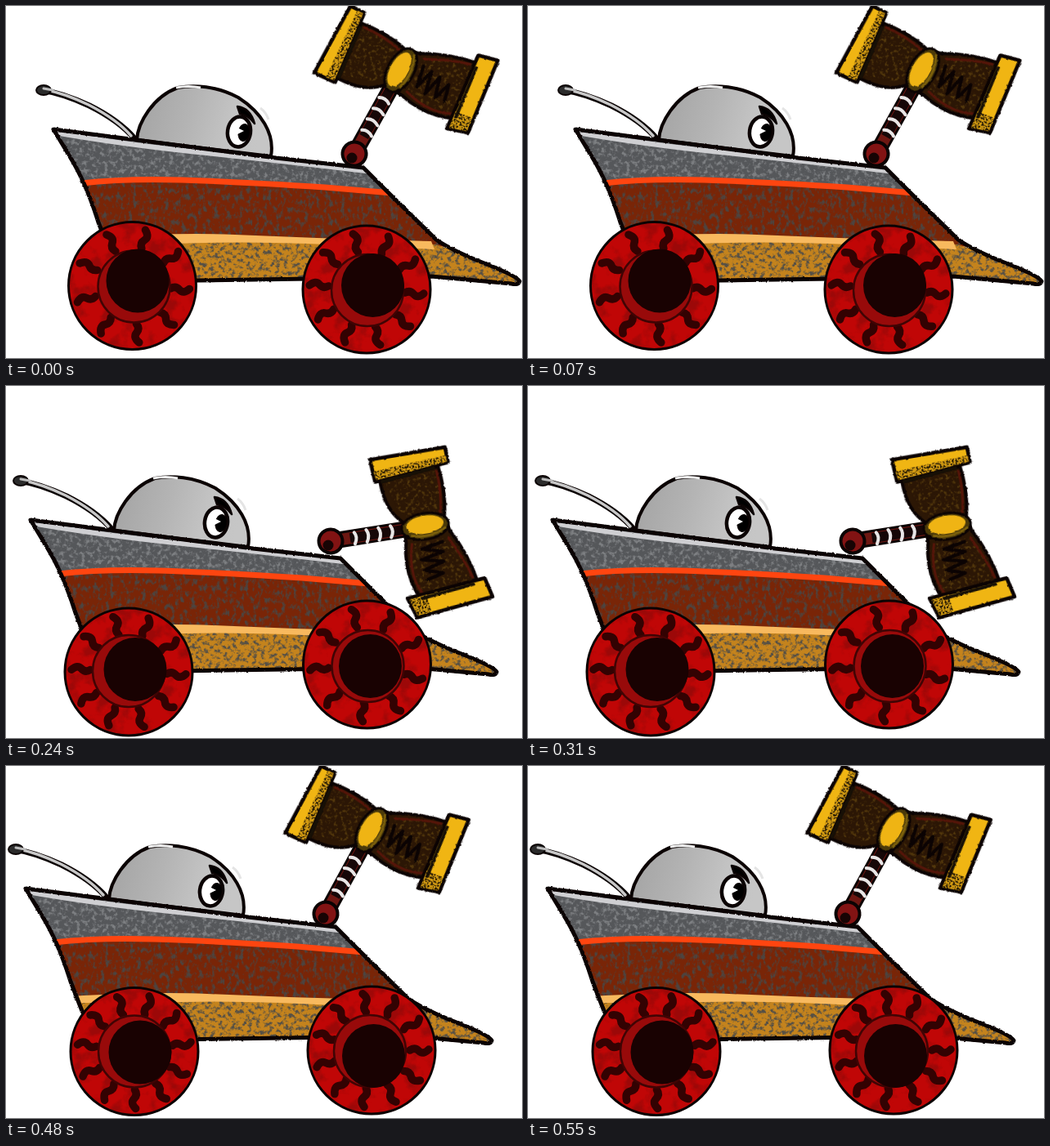
Write an HTML page that moves like this. It is 631 px wide and 431 px high and loops after 0.6 s.

```html
<!DOCTYPE html>
<html lang="en">
<head>
<meta charset="utf-8">
<title>Hammer car</title>
<style>
html, body { margin: 0; width: 100%; height: 100%; overflow: hidden; background: #fff; }
svg { display: block; width: 631px; height: 431px; }
.ink { stroke: #0b0303; stroke-linejoin: round; stroke-linecap: round; }
.line { fill: none; }
</style>
</head>
<body>
<svg viewBox="0 0 631 431">
  <defs id="defs">
    <filter id="rough" x="-10%" y="-10%" width="120%" height="120%" color-interpolation-filters="sRGB">
      <feTurbulence type="fractalNoise" baseFrequency=".3" numOctaves="2" seed="4"/>
      <feDisplacementMap in="SourceGraphic" scale="2.5" xChannelSelector="R" yChannelSelector="G"/>
    </filter>
    <linearGradient id="shell" x2="1" y2=".15">
      <stop offset="0" stop-color="#a2a2a2"/>
      <stop offset=".45" stop-color="#b4b4b4"/>
      <stop offset=".75" stop-color="#c3c3c3"/>
      <stop offset="1" stop-color="#c6c6c6"/>
    </linearGradient>
    <clipPath id="hull">
      <path id="hullShape" d="M58 151L160 164L330 186L437 198L468 229L526 286Q546 300 590 317Q625 331 628 337Q627 342 618 340L520 331L440 333L235 336L145 338L127 301L113 265Q98 217 79 186Z"/>
    </clipPath>
  </defs>

  <g id="body">
    <g class="line" stroke-linecap="round">
      <path class="ink" d="M44 103Q70 107 102 122Q138 140 157 162" stroke-width="7"/>
      <path d="M46 102Q72 107 101 121Q136 139 153 159" stroke="#c8c8c8" stroke-width="3.5"/>
      <ellipse class="ink" cx="46" cy="103" rx="9" ry="6" fill="#2b2b2b" stroke-width="2"/>
      <path d="M46 101L57 103" stroke="#bbb" stroke-width="3"/>
    </g>
    <path class="ink" d="M160 164C161 143 180 111 210 100C230 96 258 98 284 112C312 130 329 156 324 184Z" fill="url(#shell)" stroke-width="4"/>
    <path class="line" d="M208 100Q223 97 238 100" stroke="#eee" stroke-width="3"/>
    <path class="line" d="M311 125Q318 130 321 139" stroke="#e4e4e4" stroke-width="3"/>
    <g class="ink">
      <ellipse cx="285" cy="154" rx="14" ry="18.5" fill="#fff" stroke-width="4.5" transform="rotate(8 285 154)"/>
      <ellipse cx="291" cy="155" rx="7" ry="10.5" transform="rotate(8 291 155)"/>
      <path d="M283 123Q299 125 304 144Q297 134 286 132Z" stroke-width="2.5"/>
    </g>
    <path d="M283 149L291 153L283 157Z" fill="#fff"/>

    <g clip-path="url(#hull)">
      <path d="M50 145H490V235H80Z" fill="#55575a" filter="url(#pale)"/>
      <path d="M85 214Q210 208 475 229L540 295L370 287Q240 278 105 286Z" fill="#792507" filter="url(#soot)"/>
      <path d="M105 284Q230 280 370 287L525 292L631 325V345H110Z" fill="#c4831d" filter="url(#slate)"/>
      <path class="line" d="M60 155Q140 169 235 179T440 202" stroke="#cfcfd2" stroke-width="6"/>
      <path class="line" d="M92 217Q145 211 215 213T390 222L472 229" stroke="#ff4510" stroke-width="7"/>
      <path d="M112 283Q215 277 280 280L380 284L520 288L524 298L370 291Q290 288 205 291L118 291Z" fill="#f8b95e"/>
    </g>
    <use class="ink line" href="#hullShape" stroke-width="5" filter="url(#rough)"/>
  </g>

  <g id="wheels"></g>

  <g id="hammer">
    <path class="ink" d="M8-8.5H96V8.5H8Z" fill="#6d1712" stroke-width="3"/>
    <path d="M24-6H92V6H24Z" fill="#160707"/>
    <path class="line" d="M30-6Q34 0 29 8M45-7Q49 0 44 8M60-7Q64 0 59 8M75-7Q79 0 74 7" stroke="#e9e6e6" stroke-width="4" stroke-linecap="round"/>
    <g filter="url(#rough)">
      <path class="ink" d="M144-70Q149-36 142-8L146 10Q164 42 170 78L97 86Q82 52 91 15L91-9Q72-26 71-62Z" fill="#2c1705" stroke-width="4"/>
      <path d="M140-65Q143-30 138-14L98-14Q80-30 78-60ZM142 18Q157 45 162 74L102 80Q89 52 97 19Z" fill="#2b1605" filter="url(#umber)"/>
      <path class="line" d="M138-13Q144-40 141-66M98 18Q87 54 101 81M142 17Q158 46 165 72" stroke="#551509" stroke-width="3"/>
      <path class="ink line" d="M135 22L109 27L134 34L107 40L133 46L108 53L130 60L110 65" stroke-width="4"/>
      <ellipse class="ink" cx="117" cy="0" rx="29" ry="16" fill="#4a3909" stroke-width="3"/>
      <ellipse cx="117" cy="-2" rx="23" ry="11" fill="#efb414"/>
      <path class="line" d="M98 9Q121 16 142 5" stroke="#7c600c" stroke-width="3"/>
    </g>
    <g class="ink" filter="url(#rough)" stroke-width="4.5" fill="#f0b513">
      <path d="M156-92L157-73L65-63L63-91Z"/>
      <path d="M179 74L185 98L90 109L82 84Z"/>
    </g>
    <path d="M155-82L156-74L67-65L65-76ZM106 83L108 104L91 107L84 86Z" fill="#d29a12" filter="url(#grit)"/>
    <path class="line" d="M140-69L72-62M166 79L98 87" stroke="#171006" stroke-width="4" filter="url(#rough)"/>
    <circle class="ink" r="14.5" fill="#821313" stroke-width="4"/>
  </g>
  <circle id="bolt" r="6.5" fill="#170404"/>
</svg>

<script>
const STEP = 120;
const $ = id => document.getElementById(id);

function make(tag, attrs, parent) {
  const el = document.createElementNS('http://www.w3.org/2000/svg', tag);
  for (const k in attrs) el.setAttribute(k, attrs[k]);
  parent.append(el);
  return el;
}

// Paints noise patches of one colour inside the filtered shape.
function speckle(id, color, freq, gain, cut, seed) {
  const f = make('filter', { id, x: '-5%', y: '-5%', width: '110%', height: '110%',
    'color-interpolation-filters': 'sRGB' }, $('defs'));
  make('feTurbulence', { type: 'fractalNoise', baseFrequency: freq, numOctaves: 4, seed }, f);
  make('feColorMatrix', { values: `0 0 0 0 0 0 0 0 0 0 0 0 0 0 0 0 0 0 ${gain} ${-gain * cut}`, result: 'mask' }, f);
  make('feFlood', { 'flood-color': color }, f);
  make('feComposite', { in2: 'mask', operator: 'in' }, f);
  make('feComposite', { in2: 'SourceAlpha', operator: 'in', result: 'spots' }, f);
  const merge = make('feMerge', {}, f);
  make('feMergeNode', { in: 'SourceGraphic' }, merge);
  make('feMergeNode', { in: 'spots' }, merge);
}
speckle('pale', '#7d7f82', '.2', 4, .48, 3);
speckle('soot', '#4c4440', '.2 .13', 4, .49, 8);
speckle('slate', '#565045', '.2', 4, .47, 12);
speckle('umber', '#54390c', '.25', 5, .53, 5);
speckle('grit', '#1c1304', '.45', 9, .5, 9);
speckle('rust', '#9c0808', '.05', 4, .5, 2);

function makeWheel() {
  const g = make('g', {}, $('wheels'));
  make('circle', { r: 78, fill: '#c00606', filter: 'url(#rust)' }, g);
  const spokes = make('g', { class: 'line', stroke: '#330202', 'stroke-width': 9.5,
    'stroke-linecap': 'round', 'stroke-linejoin': 'round' }, g);
  make('circle', { class: 'ink line', r: 78, 'stroke-width': 3 }, g);
  const ring = make('circle', { r: 44, fill: '#980a0a', stroke: '#400404', 'stroke-width': 2.5 }, g);
  const hub = make('ellipse', { rx: 38.5, ry: 39, fill: '#190202' }, g);
  return { g, spokes, ring, hub };
}

const rear = makeWheel();
const front = makeWheel();

// body: x, y; arm: x, y, angle; wheels: x, y, turn, spokes, ring x, y, hub x, y
const poses = [
  { body: [0, 0], arm: [426, 181, -61], rear: [154.5, 342.5, 4, 9, 2, 1, 6.5, -6], front: [441, 347, 5, 10, 1, 1, 7.5, -5] },
  { body: [-15, 0], arm: [409, 179, -32.2], rear: [151.5, 345, 21, 9, 0, 2, 9, -4], front: [440, 346, 17, 9, 3, 1, 7, -2] },
  { body: [-28, 13], arm: [397, 190, -9], rear: [150, 350, 3, 10, 0, -1, 8, -3], front: [441.5, 341, 15, 9, 1, 2, 4, 2] },
  { body: [-14, 13], arm: [390, 192, -32.6], rear: [153.5, 350.5, 15, 9, -1, 1, 7.5, -1], front: [442, 345.5, 1, 10, 2, 5, 8, 5] },
  { body: [-34, -1], arm: [391, 181, -61.3], rear: [157, 349.5, 24, 11, 0, 0, 7, 1], front: [447, 348, 0, 11, -2, 1, 2.5, 7] }
];

const shift = (el, x, y, a = 0) => el.setAttribute('transform', `translate(${x} ${y}) rotate(${a})`);

function poseWheel(w, [x, y, turn, count, rx, ry, hx, hy]) {
  shift(w.g, x, y);
  w.spokes.replaceChildren();
  for (let k = 0; k < count; k++)
    make('path', { d: 'M47 0q6-4 11 1t12-2', transform: `rotate(${turn + k * 360 / count})` }, w.spokes);
  shift(w.ring, rx, ry);
  shift(w.hub, hx, hy);
}

let shown = -1;
function draw(ms) {
  const i = Math.floor(ms / STEP) % poses.length;
  if (i === shown) return;
  shown = i;
  const p = poses[i];
  shift($('body'), ...p.body);
  shift($('hammer'), ...p.arm);
  shift($('bolt'), p.arm[0] - 3, p.arm[1] + 5);
  poseWheel(rear, p.rear);
  poseWheel(front, p.front);
}

const start = performance.now();
function tick() {
  draw(performance.now() - start);
  requestAnimationFrame(tick);
}
tick();
</script>
</body>
</html>
```
